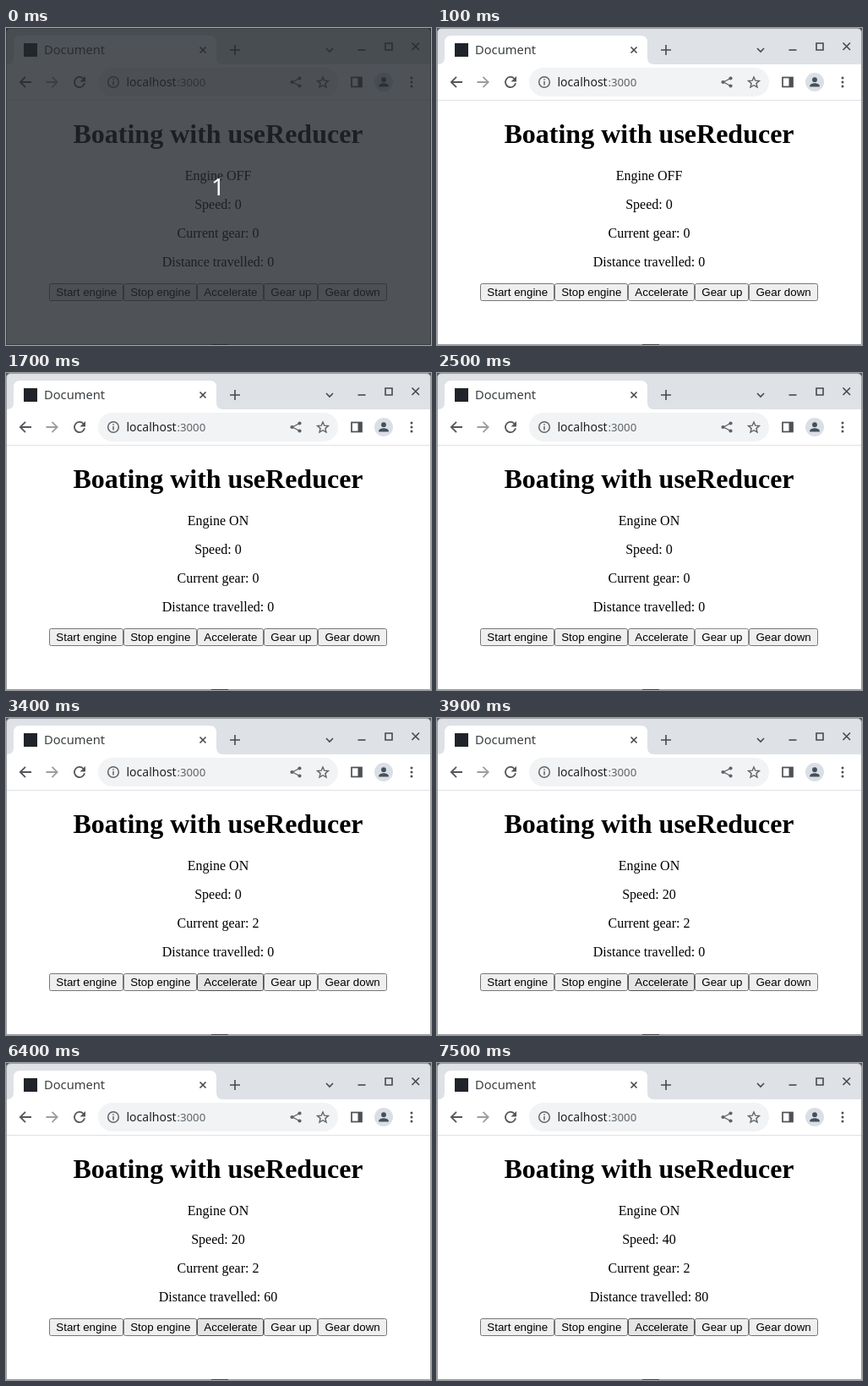
An HTML page for the animation above (8 s loop, 503 by 375 pixels).

```html
<!DOCTYPE html>
<html lang="en">
<head>
<meta charset="utf-8">
<title>Document</title>
<style>
  html, body { margin: 0; width: 100%; height: 100%; overflow: hidden; background: #fff; }
  #stage { position: absolute; left: 0; top: 0; width: 503px; height: 375px; overflow: hidden; }
  svg { position: absolute; left: 0; top: 0; }
  .ui { font-family: "Noto Sans", "Open Sans", sans-serif; }
  .page {
    position: absolute; left: 1px; top: 86px; width: 500px; height: 288px;
    font: 16px "Liberation Serif", "Times New Roman", serif;
    text-align: center; color: #000;
  }
  h1 { font-size: 32px; font-weight: bold; margin: 21.44px 0; }
  p { margin: 16px 0; }
  .buttons { position: absolute; left: 0; top: 216px; width: 500px; height: 21px; display: flex; justify-content: center; }
  button {
    appearance: none; box-sizing: border-box; height: 21px; margin: 0; padding: 2px 7px;
    font: 13.3333px "Liberation Sans", Arial, sans-serif; white-space: nowrap; color: #000;
    background: #efefef; border: 1px solid #767676; border-radius: 2.5px; pointer-events: none;
  }
  button.hover { background: #e5e5e5; border-color: #4f4f4f; }
  button.press { background: #f5f5f5; border-color: #8d8d8d; }
  #countdown { position: absolute; inset: 0; background: rgba(36, 40, 45, .8); }
</style>
</head>
<body>
<div id="stage">
  <div class="page">
    <h1>Boating with useReducer</h1>
    <p>Engine <span id="engine">OFF</span></p>
    <p>Speed: <span id="speed">0</span></p>
    <p>Current gear: <span id="gear">0</span></p>
    <p>Distance travelled: <span id="distance">0</span></p>
    <div class="buttons"><button>Start engine</button><button>Stop engine</button><button>Accelerate</button><button>Gear up</button><button>Gear down</button></div>
  </div>

  <svg width="503" height="375" fill="none">
    <!-- tab strip and toolbar -->
    <path d="M0 0H503V43H0Z" fill="#dee1e6"/>
    <path d="M1 43H502V85H1Z" fill="#fff"/>
    <path d="M1 43Q9 43 9 35V17Q9 9 17 9H241Q249 9 249 17V35Q249 43 257 43Z" fill="#fff"/>
    <path d="M1 85.5H502" stroke="#dfe1e5"/>
    <rect x="21" y="18" width="16" height="16" fill="#20232a"/>
    <text class="ui" x="45" y="31" font-size="14.7" fill="#3c4043">Document</text>

    <g stroke="#45494d" stroke-width="1.6">
      <path d="M229.5 22.5l7 7m0-7l-7 7"/>
      <path d="M271 20v12M265 26h12"/>
      <path d="M379 24l4 4 4-4"/>
      <path d="M416.5 26h9"/>
      <path d="M449 18h8v8h-8Z"/>
      <path d="M480.5 17.5l8.5 8.5m0-8.5l-8.5 8.5"/>
    </g>

    <!-- navigation -->
    <g stroke-width="1.8">
      <path d="M30 64H17.5M23 57.8L16.8 64l6.2 6.2" stroke="#53575b"/>
      <path d="M47.500 64H60M54.500 57.800L60.700 64l-6.200 6.200" stroke="#9a9da1"/>
      <path d="M91.600 60A6.100 6.100 0 1 0 93 65.300" stroke="#53575b"/>
    </g>
    <path d="M94 57v6.500h-6.500Z" fill="#53575b"/>

    <!-- address bar -->
    <rect x="109" y="47" width="284" height="34" rx="17" fill="#f1f3f4"/>
    <g stroke="#5f6368" stroke-width="1.5">
      <circle cx="127" cy="64" r="6.300"/>
      <path d="M127 63v4.500M127 60.200v1.600"/>
      <path d="M347.500 59.500L339 64l8.500 4.500" stroke-width="1.300"/>
      <path d="M375 58l1.800 4.200 4.600.4-3.500 3 1.100 4.500-4-2.400-4 2.400 1.100-4.500-3.500-3 4.600-.4Z" stroke-width="1.400"/>
    </g>
    <g fill="#5f6368">
      <circle cx="347.500" cy="59.500" r="2.100"/>
      <circle cx="338.500" cy="64" r="2.100"/>
      <circle cx="347.500" cy="68.500" r="2.100"/>
    </g>
    <text class="ui" x="142.500" y="69" font-size="14" fill="#202124">localhost</text>
    <text class="ui" x="202.500" y="69" font-size="13.200" fill="#5f6368">:3000</text>

    <!-- side panel, profile, menu -->
    <rect x="409" y="58.500" width="12" height="11" stroke="#4d5155" stroke-width="1.700"/>
    <path d="M416.500 58H421V70H416.500Z" fill="#4d5155"/>
    <circle cx="447" cy="64" r="11" fill="#dadfe6"/>
    <g fill="#46505d">
      <circle cx="447" cy="61.200" r="2.900"/>
      <path d="M441.200 69.500v-1.200c0-2 3.800-3.100 5.800-3.100s5.800 1.100 5.800 3.100v1.200Z"/>
    </g>
    <g fill="#4d5155">
      <circle cx="480" cy="59" r="1.500"/>
      <circle cx="480" cy="64" r="1.500"/>
      <circle cx="480" cy="69" r="1.500"/>
    </g>

    <!-- window frame -->
    <path d="M0 0H7Q0 0 0 7ZM503 0H496Q503 0 503 7Z" fill="#55585c"/>
    <path d="M.5 375V6Q.5 .5 6 .5H497Q502.500 .5 502.500 6V374.500H0" stroke="#9a9c9f"/>
    <path d="M243 374.500H263" stroke="#444"/>
  </svg>

  <div id="countdown">
    <svg width="503" height="375"><text class="ui" x="251" y="198" font-size="28" text-anchor="middle" fill="#fff">1</text></svg>
  </div>
</div>
<script>
  const LOOP = 8000, START = 0, ACCELERATE = 2, GEAR_UP = 3;
  const initial = { countdown: true, engine: "OFF", speed: 0, gear: 0, distance: 0, target: -1, press: false };

  // Each step lists only what changes at its time.
  const steps = [
    [100, { countdown: false }],
    [500, { target: START }],
    [800, { press: true }],
    [1000, { press: false, engine: "ON" }],
    [1700, { target: -1 }],
    [2000, { target: GEAR_UP }],
    [2500, { press: true }],
    [2600, { press: false, gear: 1 }],
    [3000, { press: true }],
    [3100, { press: false, gear: 2 }],
    [3400, { target: ACCELERATE }],
    [3800, { press: true }],
    [3900, { press: false, speed: 20 }],
    [4400, { distance: 20 }],
    [5400, { distance: 40 }],
    [6400, { distance: 60 }],
    [7400, { press: true, distance: 80 }],
    [7500, { press: false, speed: 40 }]
  ];

  const byId = id => document.getElementById(id);
  const fields = ["engine", "speed", "gear", "distance"];
  const buttons = document.querySelectorAll("button");

  function stateAt(time) {
    return Object.assign({}, initial, ...steps.filter(([at]) => at <= time).map(([, change]) => change));
  }

  function render(state) {
    for (const name of fields) byId(name).textContent = state[name];
    byId("countdown").style.display = state.countdown ? "" : "none";
    buttons.forEach((button, i) => {
      button.className = i !== state.target ? "" : state.press ? "press" : "hover";
    });
  }

  function tick() {
    render(stateAt(performance.now() % LOOP));
    requestAnimationFrame(tick);
  }
  tick();
</script>
</body>
</html>
```
